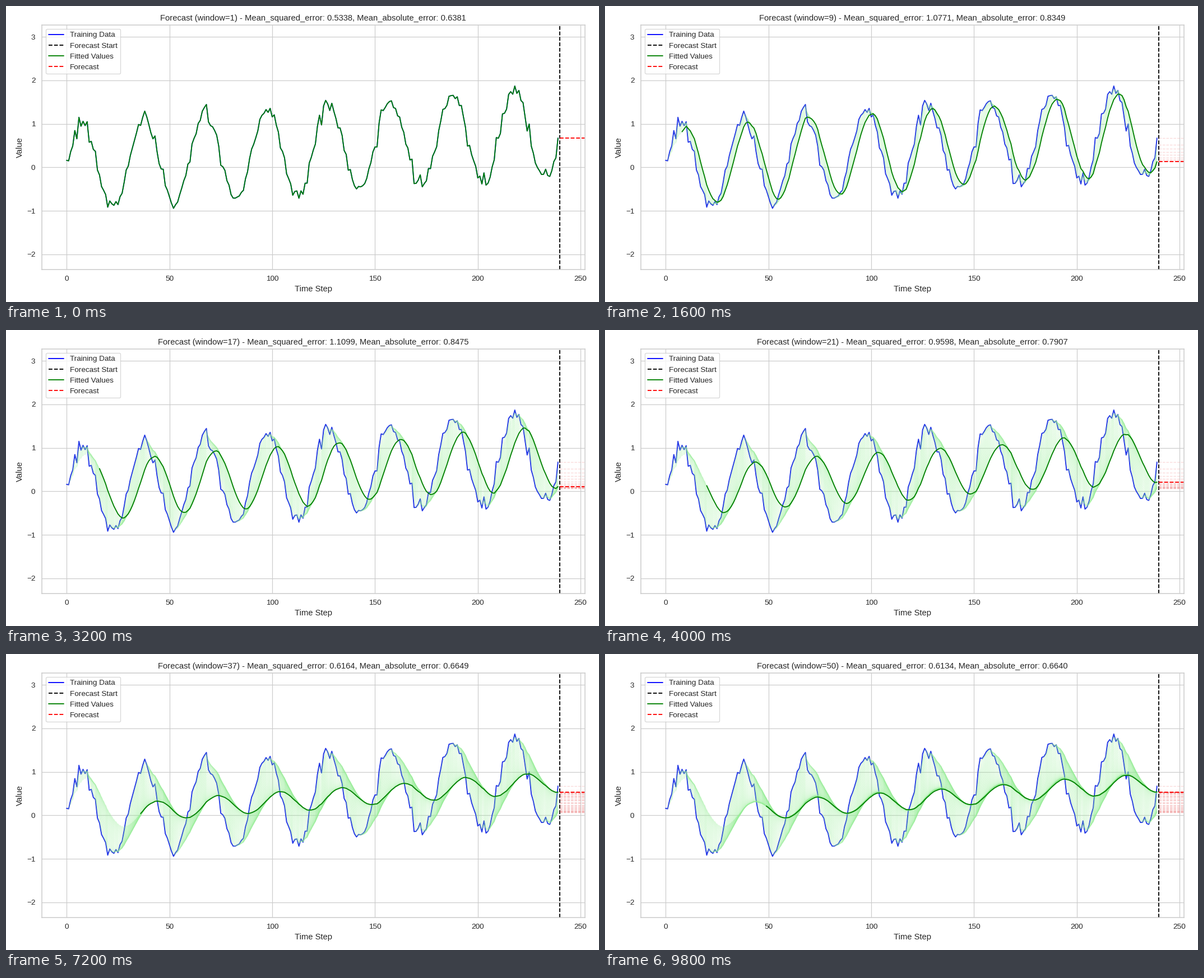
Recreate the animation shown at these times as a matplotlib script. Size 1058 by 529 pixels, loop 10 s.

```python
import numpy as np
import matplotlib.pyplot as plt
from matplotlib.animation import FuncAnimation

W, H = 1058, 529
TOTAL, TRAIN, PERIOD, MAX_WINDOW = 300, 240, 30, 50
GREY, INK = "0.8", "0.15"

plt.rcParams.update({
    "font.family": "Liberation Sans",
    "text.color": INK, "axes.labelcolor": INK,
    "xtick.color": INK, "ytick.color": INK,
    "axes.edgecolor": GREY, "axes.linewidth": 1.25,
    "grid.color": GREY, "grid.linewidth": 1,
    "axes.axisbelow": True,
    "axes.titlesize": 12, "axes.labelsize": 12,
    "xtick.labelsize": 11, "ytick.labelsize": 11, "legend.fontsize": 11,
    "lines.linewidth": 1.5, "lines.solid_capstyle": "round",
})


def weighted_average(values, window):
    """Trailing average whose weights grow linearly towards the newest value."""
    weights = np.arange(window, 0, -1)
    return np.convolve(values, weights / weights.sum(), "valid")


def errors(forecast_value):
    diff = test - forecast_value
    return np.mean(diff ** 2), np.mean(np.abs(diff))


# Trend and season are both normalised to a maximum of 1.
steps = np.arange(TOTAL)
trend = np.linspace(0, 1, TOTAL)
season = np.sin(2 * np.pi * steps / PERIOD)
season /= season.max()
noise = np.random.RandomState(1).normal(0, 0.1, TOTAL)
data = trend + season + noise
train, test = data[:TRAIN], data[TRAIN:]

fits = [weighted_average(train, w) for w in range(1, MAX_WINDOW + 1)]
scores = [errors(fit[-1]) for fit in fits]

fig = plt.figure(figsize=(12, 6), dpi=W / 12, facecolor="white")
left, right, top, bottom = 64.1, 1032.5, 33.8, 470.8
ax = fig.add_axes([left / W, 1 - bottom / H, (right - left) / W, (bottom - top) / H])
margin = np.ptp(train) / 2
ax.set(xlim=(-12, 252), ylim=(train.min() - margin, train.max() + margin),
       xlabel="Time Step", ylabel="Value",
       xticks=range(0, 251, 50), yticks=range(-2, 4))
ax.tick_params(length=0, pad=9.5)
ax.grid(True)


def plot_fit(i, **style):
    return ax.plot(steps[i:TRAIN], fits[i], **style)[0]


def plot_forecast(i, **style):
    return ax.plot([TRAIN, TOTAL - 1], [fits[i][-1]] * 2, ls="--", **style)[0]


ax.plot(steps[:TRAIN], train, color="blue", label="Training Data")
ax.axvline(TRAIN, color="black", ls="--", label="Forecast Start")
faint = dict(alpha=0.3, lw=1)
trails = [(plot_fit(i, color="lightgreen", **faint),
           plot_forecast(i, color="lightcoral", **faint))
          for i in range(MAX_WINDOW - 1)]
fitted = plot_fit(0, color="green", label="Fitted Values")
forecast = plot_forecast(0, color="red", label="Forecast")
ax.legend(loc="upper left", framealpha=0.8, edgecolor=GREY)
title = ax.set_title("")


def update(frame):
    for i, pair in enumerate(trails):
        for line in pair:
            line.set_visible(i < frame)
    fitted.set_data(steps[frame:TRAIN], fits[frame])
    forecast.set_ydata([fits[frame][-1]] * 2)
    mse, mae = scores[frame]
    title.set_text(f"Forecast (window={frame + 1}) - Mean_squared_error: {mse:.4f}, "
                   f"Mean_absolute_error: {mae:.4f}")
    return fitted, forecast, title


anim = FuncAnimation(fig, update, frames=MAX_WINDOW, interval=200,
                     init_func=lambda: update(0), repeat=True, repeat_delay=0)
plt.show()
```
